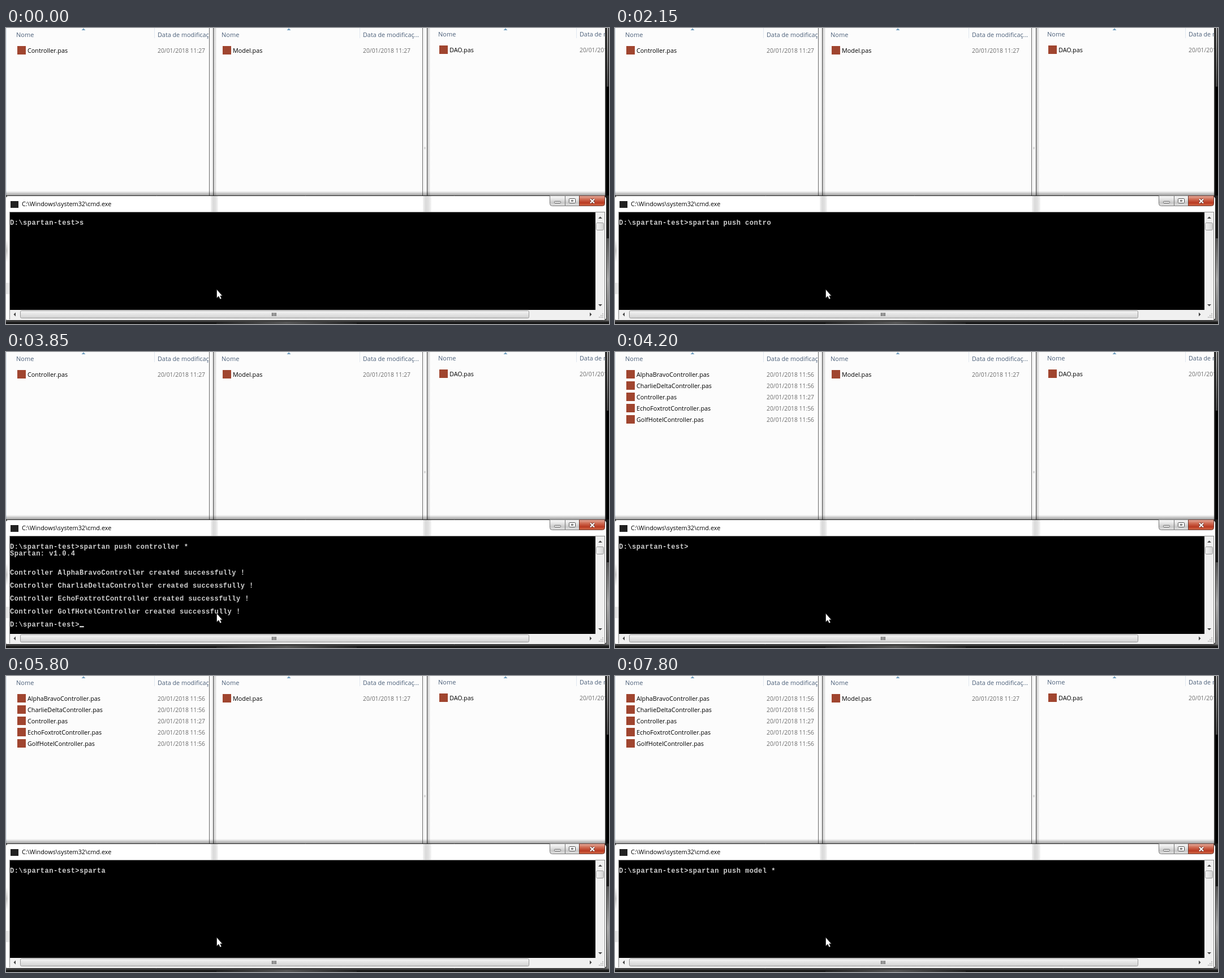
An HTML page with a canvas for the animation above (8000 ms loop, 1066 by 525 pixels).

```html
<!DOCTYPE html>
<html lang="pt">
<head>
<meta charset="utf-8">
<title>Console</title>
<style>
html, body { margin: 0; width: 100%; height: 100%; overflow: hidden; background: #fff; }
canvas { display: block; }
</style>
</head>
<body>
<canvas id="stage" width="1066" height="525"></canvas>
<script>
const ctx = document.getElementById('stage').getContext('2d');
const LOOP = 8000, CELL = 7.69, LINE = 11.5;
const UI = '"Open Sans", "Noto Sans", sans-serif';
const PROMPT = 'D:\\spartan-test>';
const FIRST = 'spartan push controller *', SECOND = 'spartan push model *';
const OUTPUT = ['AlphaBravo', 'CharlieDelta', 'EchoFoxtrot', 'GolfHotel']
  .flatMap(n => [`Controller ${n}Controller created successfully !`, '']);

// Keystrokes: [time, text after the prompt, cursor visible]
const keys = [];
const key = (time, text, cursor = false) => keys.push([time, text, cursor]);
const type = (text, from, times) =>
  times.forEach((time, i) => key(time, text.slice(0, from + i)));

key(0, 's');
key(150, 's', true);
type(FIRST, 2, [200, 250, 300]);
type(FIRST, 5, [450, 500, 600]);
type(FIRST, 9, [850, 950, 1050, 1100]);
key(1150, 'spartan push', true);
key(1250, 'spartan push ');
key(1600, 'spartan push ', true);
type(FIRST, 14, Array.from({ length: 10 }, (_, i) => 1750 + Math.round(i * 14 / 9) * 50));
key(2600, 'spartan push controller ', true);
key(3000, 'spartan push controller ');
key(3050, FIRST);
key(4200, '');
key(4450, 'cls');
key(4550, FIRST);
key(4900, '', true);
type(SECOND, 1, [5300, 5400, 5450, 5550]);
type(SECOND, 5, [5700, 5800]);
key(5850, 'spartan', true);
key(5950, 'spartan ');
type(SECOND, 9, [6300, 6400, 6500]);
key(6650, 'spartan push');
key(6700, 'spartan push', true);
key(6800, 'spartan push ');
type(SECOND, 14, [6950, 7050]);
key(7100, 'spartan push mode');
key(7200, 'spartan push model');
key(7550, 'spartan push model ', true);
key(7800, SECOND);

function rect(x, y, w, h, fill) {
  ctx.fillStyle = fill;
  ctx.fillRect(x, y, w, h);
}

function fade(x0, y0, x1, y1, ...colors) {
  const g = ctx.createLinearGradient(x0, y0, x1, y1);
  colors.forEach((c, i) => g.addColorStop(i / (colors.length - 1), c));
  return g;
}

function box(x, y, w, h, radii, fill, stroke) {
  ctx.beginPath();
  ctx.roundRect(x + 0.5, y + 0.5, w - 1, h - 1, radii);
  ctx.fillStyle = fill;
  ctx.fill();
  ctx.strokeStyle = stroke;
  ctx.lineWidth = 1;
  ctx.stroke();
}

function poly(fill, ...points) {
  ctx.beginPath();
  points.forEach(([x, y]) => ctx.lineTo(x, y));
  ctx.closePath();
  ctx.fillStyle = fill;
  ctx.fill();
}

function label(text, x, y, color, size = 10.8) {
  ctx.font = `${size}px ${UI}`;
  ctx.fillStyle = color;
  ctx.fillText(text, x, y);
}

function pane(x, right, files, dy = 0) {
  ctx.save();
  ctx.beginPath();
  ctx.rect(x, 0, right - x, 297);
  ctx.clip();
  rect(x + 262, 0, 1, 18, '#dfe7f0');
  poly('#6d9bbd', [x + 133.5, 4], [x + 137, 0.5], [x + 140.5, 4]);
  label('Nome', x + 18, 16 + dy, '#4c607a', 11);
  label('Data de modificaç...', x + 268, 16 + dy, '#4c607a');
  files.forEach(([name, time], i) => {
    const y = 44 + dy + i * 20.1;
    rect(x + 20, Math.round(y) - 12, 15, 15, '#a0452f');
    label(name + '.pas', x + 38, y, '#000');
    label('20/01/2018 ' + time, x + 268, y, '#6d6d6d', 10.35);
  });
  ctx.restore();
}

function divider(x, line) {
  rect(x, 0, 1, 297, '#6a6a6a');
  rect(x + 1, 0, line - x - 1, 297, '#f6f6f6');
  rect(line, 0, 1, 297, '#4a4a4a');
  rect(line + 1, 0, 5, 297, fade(line + 1, 0, line + 6, 0, '#c4c4c4', '#f4f4f4'));
}

function explorer(t) {
  rect(0, 0, 1066, 297, '#fcfcfc');
  rect(0, 0, 1, 297, '#d5e0ec');
  const controllers = t < 4100 ? [['Controller', '11:27']] : [
    ['AlphaBravoController', '11:56'], ['CharlieDeltaController', '11:56'],
    ['Controller', '11:27'],
    ['EchoFoxtrotController', '11:56'], ['GolfHotelController', '11:56']];
  pane(0, 360, controllers);
  pane(363, 736, [['Model', '11:27']]);
  pane(746, 1059, [['DAO', '11:27']], -0.7);
  divider(359, 366);
  divider(736, 744);
  rect(739, 211, 3, 4, '#d8d8d8');
  rect(1059, 0, 2, 297, '#333');
  rect(1061, 0, 5, 297, '#000');
  rect(1062, 0, 3, 104, fade(0, 0, 0, 104, '#9a9a9a', '#444'));
  rect(0, 289, 1060, 8, fade(0, 289, 0, 297, 'rgba(0,0,0,0)', 'rgba(0,0,0,.38)'));
}

function buttons() {
  const glass = fade(0, 298, 0, 316, '#f8f8f8', '#e4e4e4', '#c8c8c8', '#e6e6e6');
  const red = fade(0, 298, 0, 316, '#e3a898', '#cf6a52', '#b93a22', '#d4714f');
  box(961, 297, 28, 19, [0, 0, 0, 4], glass, '#777');
  box(988, 297, 26, 19, 0, glass, '#777');
  box(1013, 297, 46, 19, [0, 0, 4, 0], red, '#6b3a32');
  box(969, 307, 12, 4, 1, '#fff', '#555');
  box(995, 302, 12, 9, 1, '#fff', '#555');
  box(999, 305, 4, 3, 0, '#ddd', '#555');
  for (const [color, width] of [['#6a3a34', 4], ['#fff', 2.2]]) {
    ctx.beginPath();
    ctx.moveTo(1033, 303.5); ctx.lineTo(1040, 310.5);
    ctx.moveTo(1040, 303.5); ctx.lineTo(1033, 310.5);
    ctx.strokeStyle = color;
    ctx.lineWidth = width;
    ctx.stroke();
  }
}

function scrollbars() {
  const dark = '#444';
  rect(1042, 327, 16, 190, '#f0f0f0');
  rect(7, 500, 1051, 17, '#f0f0f0');
  poly(dark, [1047, 338], [1050.5, 334.5], [1054, 338]);
  poly(dark, [1047, 490], [1050.5, 493.5], [1054, 490]);
  poly(dark, [17, 504.5], [13.5, 508], [17, 511.5]);
  poly(dark, [1032, 504.5], [1035.5, 508], [1032, 511.5]);
  box(1043, 345, 14, 14, 2, fade(1043, 0, 1057, 0, '#f6f6f6', '#d2d2d2'), '#979797');
  box(25, 501, 900, 14, 2, fade(0, 501, 0, 515, '#f6f6f6', '#e4e4e4', '#cfcfcf'), '#979797');
  for (let i = 0; i < 3; i++) {
    rect(470 + i * 3, 505, 1.6, 6, '#555');
    for (let j = 0; j <= i; j++) rect(1054 - j * 3, 506 + i * 3, 2, 2, '#c0c0c0');
  }
}

function frame() {
  rect(0, 297, 1066, 228, '#1a1a1a');
  rect(1061, 373, 5, 146, fade(0, 373, 0, 519, '#555', '#aaa', '#777'));
  rect(0, 518, 1066, 7, fade(0, 518, 0, 525, '#777', '#222', '#111'));
  rect(372, 521, 248, 4, fade(372, 0, 620, 0, '#222', '#555', '#222'));
  box(-1, 297, 1063, 222, [4, 6, 5, 2], '#fff', '#222');
  for (const [x, w] of [[362, 13], [737, 15]])
    rect(x, 298, w, 28, fade(x, 0, x + w, 0, '#f2f2f2', '#dadada', '#e0e0e0', '#f6f6f6'));
  rect(0, 375, 3, 40, fade(0, 375, 0, 415, '#fff', '#ccc', '#fff'));
  rect(0, 452, 6, 20, '#e6e6e6');
  rect(8, 307, 14, 12, '#222');
  label('C:\\Windows\\system32\\cmd.exe', 28, 316, '#000', 10.87);
  buttons();
  rect(6, 326, 1053, 191, '#888');
  rect(7, 327, 1035, 173, '#000');
  scrollbars();
}

function consoleText(t) {
  const [, text, blink] = keys.findLast(k => k[0] <= t);
  const lines = [PROMPT + text];
  let cursor = blink;
  if (t >= 3250 && t < 4200) {
    lines.push('Spartan: v1.0.4');
    if (t >= 3300) lines.push('', '', ...OUTPUT, PROMPT);
    cursor = t >= 3850;
  }
  ctx.font = 'bold 12px "Liberation Mono", "DejaVu Sans Mono", monospace';
  ctx.letterSpacing = '0.49px';
  ctx.fillStyle = '#d0d0d0';
  lines.forEach((line, i) => ctx.fillText(line, 7, 349 + i * LINE));
  ctx.letterSpacing = '0px';
  if (cursor) {
    const row = lines.length - 1;
    rect(7 + lines[row].length * CELL, 348 + row * LINE, CELL, 2.3, '#d0d0d0');
  }
}

function pointer() {
  poly('#fff', [372.5, 463.5], [372.5, 479], [376, 475.8], [378.5, 481],
    [381, 480], [378.7, 475], [382.5, 475]);
  ctx.strokeStyle = '#222';
  ctx.lineWidth = 0.7;
  ctx.stroke();
}

function draw(now) {
  const t = now % LOOP;
  explorer(t);
  frame();
  consoleText(t);
  pointer();
}

const start = performance.now();
function tick() {
  draw(performance.now() - start);
  requestAnimationFrame(tick);
}
tick();
</script>
</body>
</html>
```
